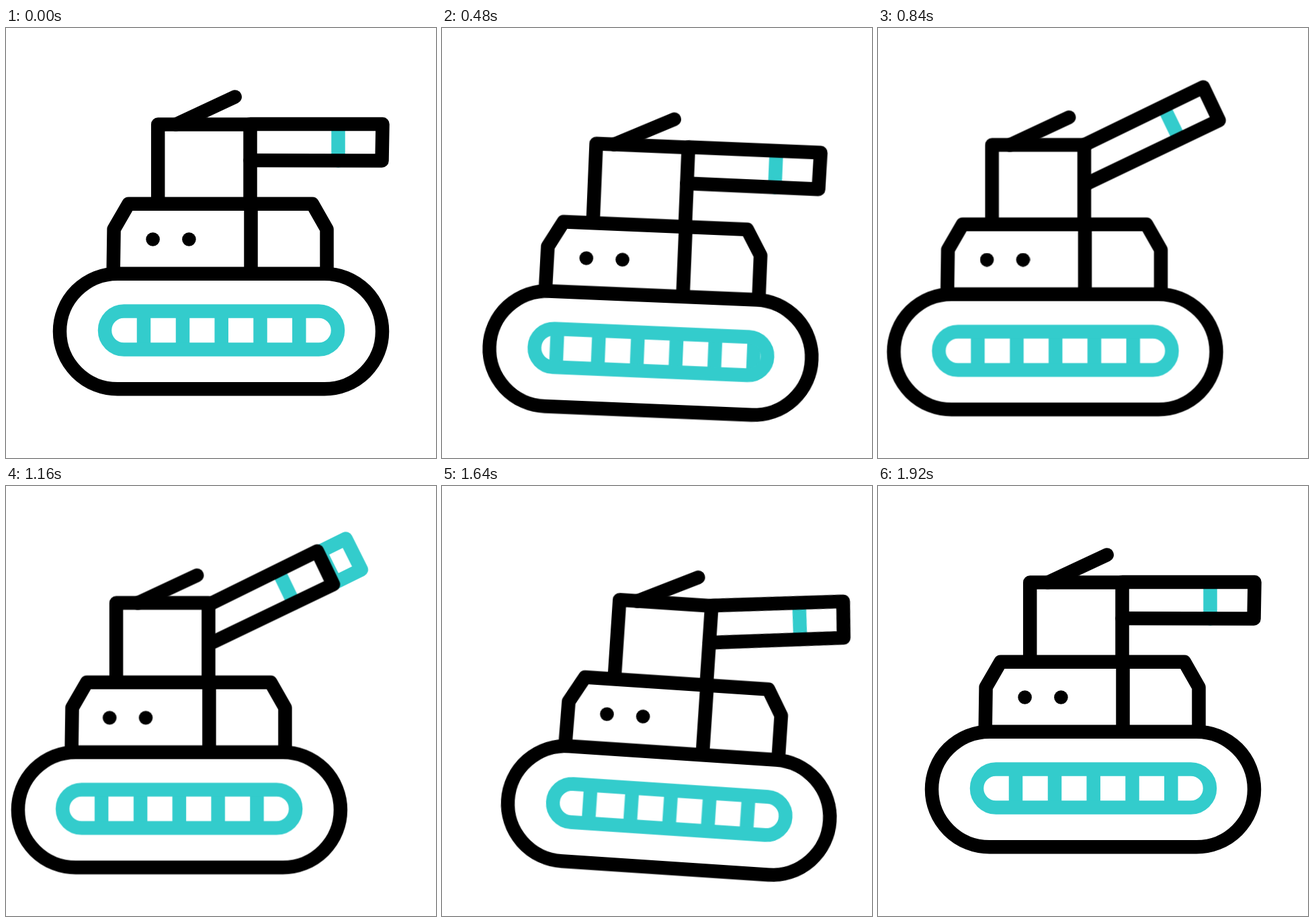
An HTML page for the animation above (2 s loop, 640x640 px).

```html
<!DOCTYPE html>
<html lang="en">
<head>
<meta charset="utf-8">
<title>Tank</title>
<style>
  html, body { margin: 0; width: 100%; height: 100%; overflow: hidden; background: #fff; }

  .stage { position: relative; width: 100%; height: 100%; overflow: hidden; contain: paint; }

  .tank, .tank * {
    animation: 2s linear infinite;
  }
  .tank {
    position: absolute; left: 0; top: 0; width: 640px; height: 640px;
    transform-origin: 320px 451.5px;
    offset-anchor: 320px 451.5px;
    offset-rotate: 0deg;
    offset-path: path("M320 451.5C320 451.5 348.9 478 341.5 482C334.1 486 263.5 482 263.5 482");
    animation-name: drive;
  }
  svg {
    display: block; overflow: visible; fill: none;
    stroke: #000; stroke-width: 20.5; stroke-linecap: round; stroke-linejoin: round;
  }
  .teal { stroke: #3cc; }
  .dots { fill: #000; stroke: none; }
  .bars { animation-name: roll; }
  .hull { animation-name: recoil; --kick: 1; }
  .belt { animation-name: recoil; --kick: 1.12; }
  .dots { animation-name: recoil; --kick: 1.4; }
  .barrel { animation-name: aim; }
  .stripe { animation-name: aim-stripe; }
  .shell { animation-name: fire; }

  /* out, back past the start, wait, then the same way home */
  @keyframes drive {
    0%, 6%, 95%, 100% { offset-distance: 0%; transform: rotate(0deg); }
    18%, 82.7% { offset-distance: 33.4%; transform: rotate(4deg); }
    33.1%, 70.6% { offset-distance: 100%; transform: rotate(0deg); }
  }
  @keyframes roll {
    0%, 6%, 33.1%, 70.6%, 95%, 100% { transform: translateX(0); }
    18%, 82.7% { transform: translateX(62px); }
  }
  @keyframes recoil {
    0%, 52%, 66%, 100% { transform: translateX(0); }
    58% { transform: translateX(calc(var(--kick) * -5.5px)); }
    60% { transform: translateX(calc(var(--kick) * -11.5px)); }
  }
  @keyframes aim {
    0%, 34%, 84%, 100% { d: path("M363.5 197L559.5 197.5L560.5 143L363.5 143"); }
    38%, 79.5% { d: path("M364.5 200L566.7 152.3L555.4 98.9L363.5 143"); }
    42%, 50%, 66%, 75% { d: path("M365.5 202L564 107L540.5 57.5L363.5 143.5"); }
    58% { d: path("M365.5 201.5L543.5 116L519.7 66.5L363.5 143.5"); }
    60% { d: path("M365.5 201.5L544 115.5L520.2 66L363.5 143.5"); }
  }
  @keyframes aim-stripe {
    0%, 34%, 84%, 100% { d: path("M494.5 148L494.5 197.5"); }
    38%, 79.5% { d: path("M492.3 118.4L503.4 166.6"); }
    42%, 50%, 66%, 75% { d: path("M483.5 90.6L505 135"); }
    58% { d: path("M463.5 99.6L485 144"); }
    60% { d: path("M464 99.1L485.5 143.5"); }
  }
  @keyframes fire {
    0%, 57.49% { opacity: 0; transform: translate(-12px, 6px); }
    57.5% { opacity: 1; transform: translate(-12px, 6px); }
    58% { opacity: 1; transform: translate(0, 0); }
    66% { opacity: 1; transform: translate(198px, -99px); }
    66.01%, 100% { opacity: 0; transform: translate(198px, -99px); }
  }
</style>
</head>
<body>
<div class="stage">
  <div class="tank">
    <svg width="640" height="640" viewBox="0 0 640 640">
      <clipPath id="slot"><rect x="147" y="421.5" width="347" height="57" rx="28.5"/></clipPath>

      <g class="belt teal">
        <g clip-path="url(#slot)">
          <path class="bars" d="M143 415v70M205 415v70M263 415v70M320.7 415v70M378.5 415v70M436.3 415v70"/>
        </g>
        <rect x="147" y="421.5" width="347" height="57" rx="28.5"/>
      </g>

      <path class="shell teal" d="M561 48.5L584 94.5L545.5 113.5L522.5 67.5Z"/>
      <path class="stripe teal" d="M494.5 148L494.5 197.5"/>
      <path class="barrel" d="M363.5 197L559.5 197.5L560.5 143L363.5 143"/>
      <path d="M253 143.5L340.7 102.5"/>

      <g class="hull">
        <rect x="80" y="365.7" width="480" height="171.6" rx="86"/>
        <path d="M159.7 362L160.6 299.5L182.5 261.7H456L477.5 299.5V362"/>
        <path d="M364.5 261.7V365"/>
        <path d="M226.2 258V143.5H363.5V258"/>
      </g>

      <g class="dots">
        <circle cx="218.6" cy="314.5" r="10.3"/>
        <circle cx="272.4" cy="314.5" r="10.3"/>
      </g>
    </svg>
  </div>
</div>
</body>
</html>
```
